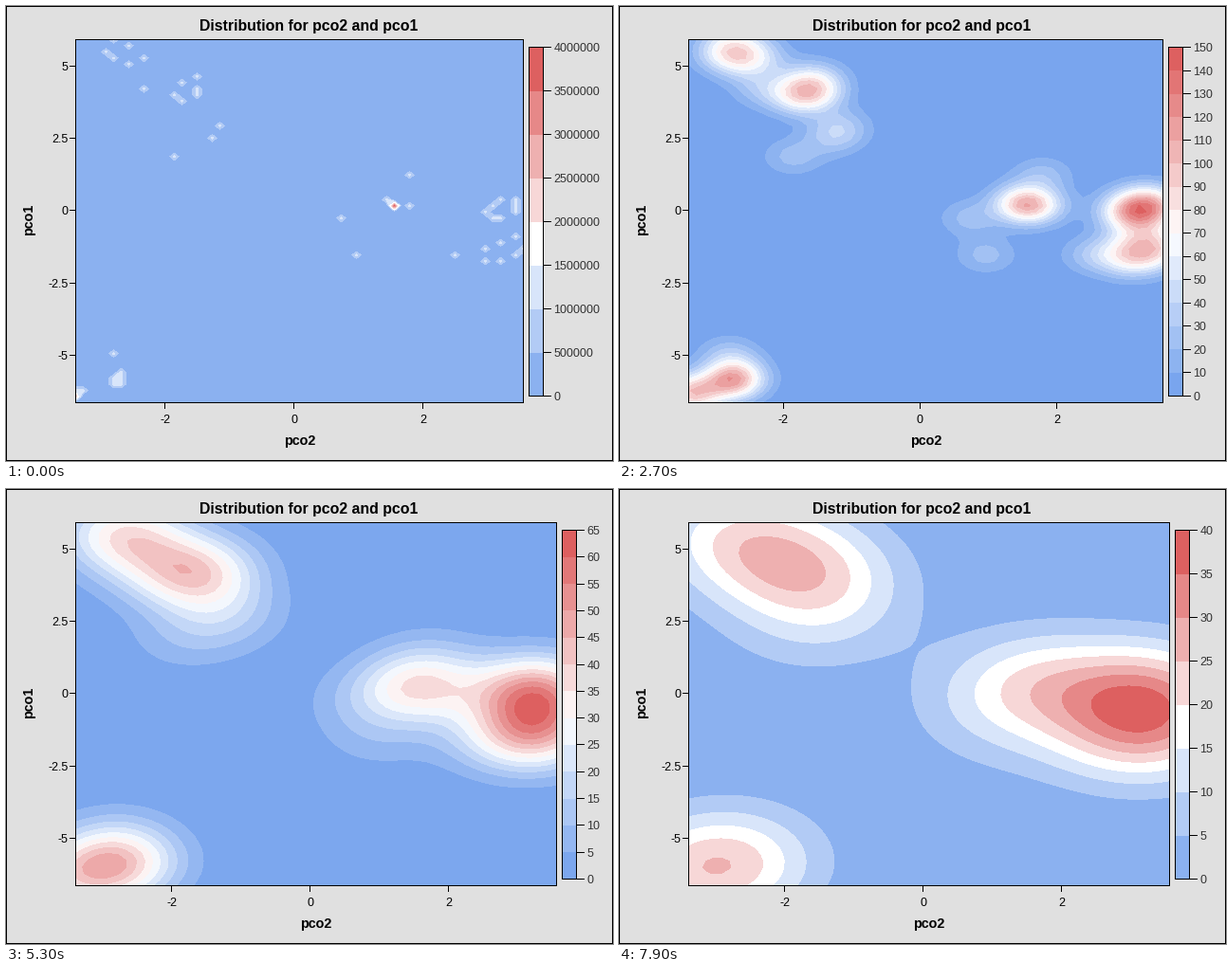
Animation of 640x480 px, one loop 8 s. Source, as a matplotlib script:

```python
import numpy as np
import matplotlib.pyplot as plt
from matplotlib.animation import FuncAnimation
from matplotlib.patches import Rectangle

W, H, DPI = 640, 480, 100
FRAMES, INTERVAL = 80, 100
GRID = 60
X0, X1, Y0, Y1 = -3.389, 3.556, -6.627, 5.906
LEFT, TOP, BOTTOM = 73.5, 35.5, 418.5
BAR_TOP, BAR_BOTTOM, BAR_W = 43.5, 411.5, 15
LOW, MID, HIGH = (np.array(c) / 255 for c in
                  [(100, 151, 235), (255, 255, 255), (221, 96, 96)])
BASE_BW, BW_STEP = 0.001, 0.0081
TILT = 1.2

# Clusters in grid cells: count, column, row, column radius, row radius
CLUSTERS = [(6, 6.2, 56.7, 2.4, -1.9), (6, 14.9, 50.8, 1.6, 1.9),
            (3, 42, 32, 0, 0), (8, 56.2, 31.7, 1.9, 1.9),
            (7, 56.3, 24.6, 2.3, 2), (5, 5.4, 4, 0.7, 1.2),
            (4, 0.25, 1.5, 0.6, 0.7)]
LONERS = [(9, 51), (19, 45), (18, 43), (13, 40), (44, 37), (44, 32), (41, 33),
          (35, 30), (37, 24), (50, 24), (5, 8)]


def cluster(count, cx, cy, rx, ry):
    """Spread the observations evenly around a tilted ellipse."""
    a = np.arange(count) * 2 * np.pi / count
    return np.column_stack([cx + rx * np.cos(a), cy + ry * np.cos(a + TILT)])


cells = np.vstack([cluster(*c) for c in CLUSTERS] + [LONERS])
cells = np.clip(np.rint(cells), 0, GRID - 1).astype(int)
gx = np.linspace(X0, X1, GRID)
gy = np.linspace(Y0, Y1, GRID)
px, py = gx[cells[:, 0]], gy[cells[:, 1]]
n = len(cells)

plt.rcParams["font.family"] = "Liberation Sans"
fig = plt.figure(figsize=(W / DPI, H / DPI), dpi=DPI)
ax = fig.add_axes([0, 0, 1, 1])


def kernel(grid, pts, h):
    return np.exp(-0.5 * ((grid[:, None] - pts) / h) ** 2) / h


def density(i):
    bw = (BASE_BW + BW_STEP * i) * n ** (-1 / 6)
    kx = kernel(gx, px, bw * px.std(ddof=1))
    ky = kernel(gy, py, bw * py.std(ddof=1))
    return 1000 / (n * 2 * np.pi) * ky @ kx.T


def nice_step(top):
    raw = top / 10
    mag = 10 ** np.floor(np.log10(raw))
    for limit, nice in ((1.5, 1), (3, 2), (7, 5)):
        if raw / mag < limit:
            return nice * mag
    return 10 * mag


def ramp(t):
    if t < 0.5:
        return LOW + (MID - LOW) * 2 * t
    return MID + (HIGH - MID) * (2 * t - 1)


def text(x, y, s, size, **kw):
    kw = {"va": "baseline", **kw}
    ax.text(x, y, s, fontsize=size * 72 / DPI, **kw)


def fill(x, y, w, h, color, z=1):
    ax.add_patch(Rectangle((x, y), w, h, facecolor=color, lw=0, zorder=z,
                           antialiased=False))


def hline(x0, x1, y):
    fill(np.floor(x0), np.floor(y), np.floor(x1) - np.floor(x0) + 1, 1, "black", 3)


def vline(x, y0, y1):
    fill(np.floor(x), np.floor(y0), 1, np.floor(y1) - np.floor(y0) + 1, "black", 3)


def frame(x0, y0, x1, y1):
    for y in (y0, y1):
        hline(x0, x1, y)
    for x in (x0, x1):
        vline(x, y0, y1)


def draw(i):
    ax.clear()
    ax.set(xlim=(0, W), ylim=(H, 0))
    ax.axis("off")
    fill(0, 0, W, H, "#e0e0e0", 0)
    frame(0, 0, W - 1, H - 1)

    z = density(i)
    step = nice_step(z.max())
    bands = int(np.ceil(z.max() / step))
    colors = [ramp((k + 1) / bands) for k in range(bands)]
    levels = step * np.arange(bands + 1)
    labels = [f"{v:.0f}" for v in levels]
    right = 594.5 - 7 * len(labels[-1])

    def to_x(v):
        return LEFT + (v - X0) / (X1 - X0) * (right - LEFT)

    def to_y(v):
        return BOTTOM - (v - Y0) / (Y1 - Y0) * (BOTTOM - TOP)

    fill(LEFT, TOP, right - LEFT, BOTTOM - TOP, colors[0], 0.5)
    ax.contourf(to_x(gx), to_y(gy), z, levels=levels[1:], colors=colors[1:],
                zorder=0.8)
    frame(LEFT, TOP, right, BOTTOM)

    for v in (-2, 0, 2):
        vline(to_x(v), BOTTOM, BOTTOM + 6)
        text(to_x(v), 439.5, str(v), 12.5, ha="center")
    for v in (-5, -2.5, 0, 2.5, 5):
        hline(LEFT - 6, LEFT, to_y(v))
        text(65.5, to_y(v) + 4.5, f"{v:g}", 12.5, ha="right")

    bar = right + 6
    edge = bar + BAR_W
    unit = (BAR_BOTTOM - BAR_TOP) / bands
    for k, color in enumerate(colors):
        fill(bar, BAR_BOTTOM - (k + 1) * unit, BAR_W, unit, color)
    frame(bar, BAR_TOP, edge, BAR_BOTTOM)
    for k, label in enumerate(labels):
        y = BAR_BOTTOM - k * unit
        hline(edge, edge + 8, y)
        text(edge + 11, y + 4.5, label, 12.5, color="#333333")

    text(319.5, 26, "Distribution for pco2 and pco1", 15.9, weight="bold",
         ha="center")
    text((LEFT + right) / 2, 462.5, "pco2", 14.4, weight="bold", ha="center")
    text(24.5, 225.5, "pco1", 14.4, weight="bold", rotation=90,
         ha="center", va="center")


anim = FuncAnimation(fig, draw, frames=FRAMES, interval=INTERVAL,
                     init_func=lambda: None, repeat=True, repeat_delay=0)
plt.show()
```
